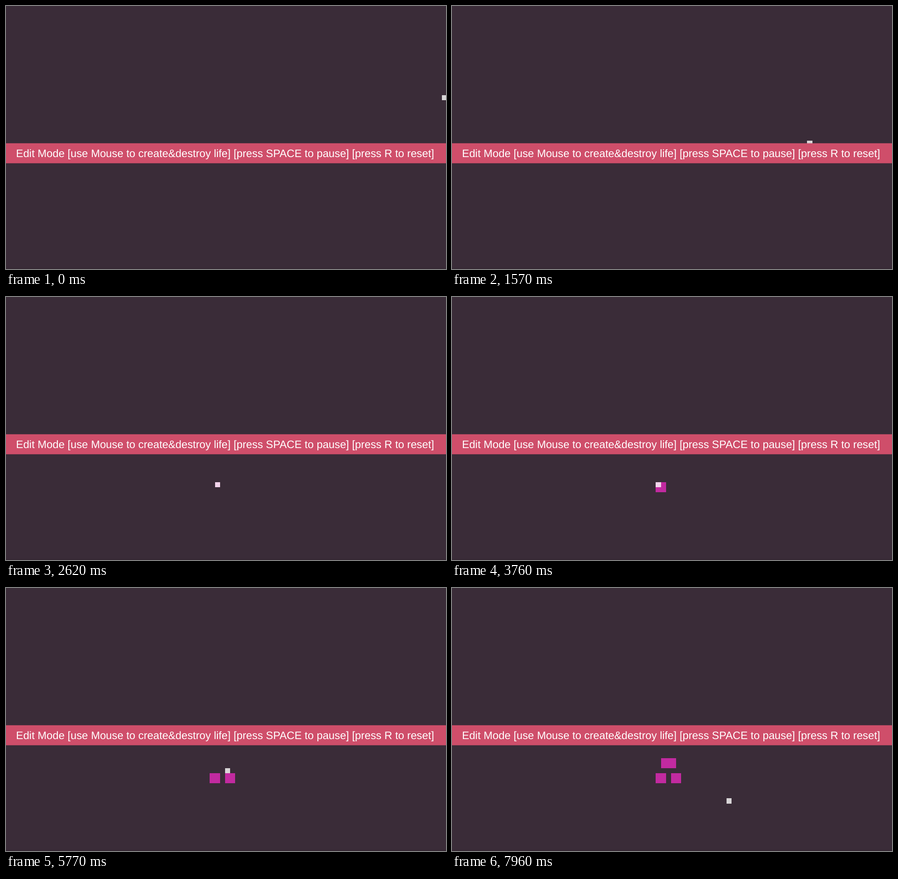
An HTML page with a canvas that plays this animation: 968 by 578 pixels, repeating every 7.99 s.

```html
<!DOCTYPE html>
<html lang="en">
<head>
<meta charset="utf-8">
<title>Life editor</title>
<style>
  html, body { margin: 0; width: 100%; height: 100%; overflow: hidden; background: #3a2c38; }
  canvas { display: block; }
</style>
</head>
<body>
<canvas id="stage" width="968" height="578"></canvas>
<script>
const ctx = document.getElementById('stage').getContext('2d');
const LOOP = 7990, TICK = 30, CELL = 11.1, LEFT = 448.4, TOP = 406.95;
const LABEL = 'Edit Mode [use Mouse to create&destroy life] [press SPACE to pause] [press R to reset]';
const HOLD = Infinity;

// Key points of the sweeping motion: time, column, row, easing power.
const ENTER = [
  [0, 46, -19],
  [100, 46, -28, HOLD],
  [910, 46, -28, HOLD],
  [1150, 43, -21, 1.2],
  [1720, 22, -4, 1.5],
  [1900, 7, 1, 0.9],
  [2170, 0, 1, 1.3]
];
const LEAVE = [[7780, 4, -2], [7960, 14, 5, 1.3]];

// Single steps: start time, pace, directions. Small letters paint, x paints in place.
const WALKS = [
  [2230, 105, 'URU'],
  [2590, 30, 'Dx'],
  [3400, 60, 'dl'],
  [3760, 30, 'ur'],
  [4180, 30, 'RRR'],
  [4450, 180, 'Lx'],
  [4900, 180, 'dr'],
  [5170, 270, 'ul'],
  [5770, 30, 'ULUx'],
  [6220, 90, 'lu'],
  [6580, 150, 'rrd'],
  [7150, 0, 'R']
];
const STEP = { U: [0, -1], D: [0, 1], L: [-1, 0], R: [1, 0], X: [0, 0] };

function glide(keys, t) {
  const i = keys.findIndex(key => key[0] > t);
  if (i < 0) return keys.at(-1).slice(1, 3);
  const [t0, c0, r0] = keys[i - 1];
  const [t1, c1, r1, power] = keys[i];
  const u = ((t - t0) / (t1 - t0)) ** power;
  return [Math.round(c0 + (c1 - c0) * u), Math.round(r0 + (r1 - r0) * u)];
}

function walk(t) {
  let [c, r] = ENTER.at(-1).slice(1, 3);
  const live = [];
  for (const [start, pace, moves] of WALKS) {
    [...moves].forEach((move, i) => {
      if (t < start + i * pace) return;
      const [dc, dr] = STEP[move.toUpperCase()];
      c += dc;
      r += dr;
      if (move !== move.toUpperCase()) live.push([c, r]);
    });
  }
  return { pointer: [c, r], live };
}

function pointerAt(t) {
  if (t < WALKS[0][0]) return glide(ENTER, t);
  if (t >= LEAVE[0][0]) return glide(LEAVE, t);
  return walk(t).pointer;
}

function fillCell([c, r], color) {
  const x = Math.round(LEFT + c * CELL), y = Math.round(TOP + r * CELL);
  const right = Math.round(LEFT + (c + 1) * CELL), bottom = Math.round(TOP + (r + 1) * CELL);
  ctx.fillStyle = color;
  ctx.fillRect(x, y, right - x, bottom - y);
}

function fillBand(top, bottom, color) {
  ctx.fillStyle = color;
  ctx.fillRect(0, top, 968, bottom - top);
}

function draw(time) {
  const t = Math.floor((time - 10) / TICK) * TICK + 10;
  fillBand(0, 578, '#3a2c38');
  fillBand(575.5, 578, '#352833');
  walk(t).live.forEach(cell => fillCell(cell, '#c22aa0'));
  fillCell(pointerAt(Math.max(t, 0)), 'rgba(255, 255, 255, 0.8)');
  fillBand(301.65, 345.6, '#cf4e6a');
  ctx.font = '23.72px "Liberation Sans", Arial, sans-serif';
  ctx.fontKerning = 'normal';
  ctx.textRendering = 'geometricPrecision';
  ctx.fillStyle = '#fff';
  ctx.fillText(LABEL, 22.1, 332);
}

const begin = performance.now();
function frame() {
  draw((performance.now() - begin) % LOOP);
  requestAnimationFrame(frame);
}
frame();
</script>
</body>
</html>
```
